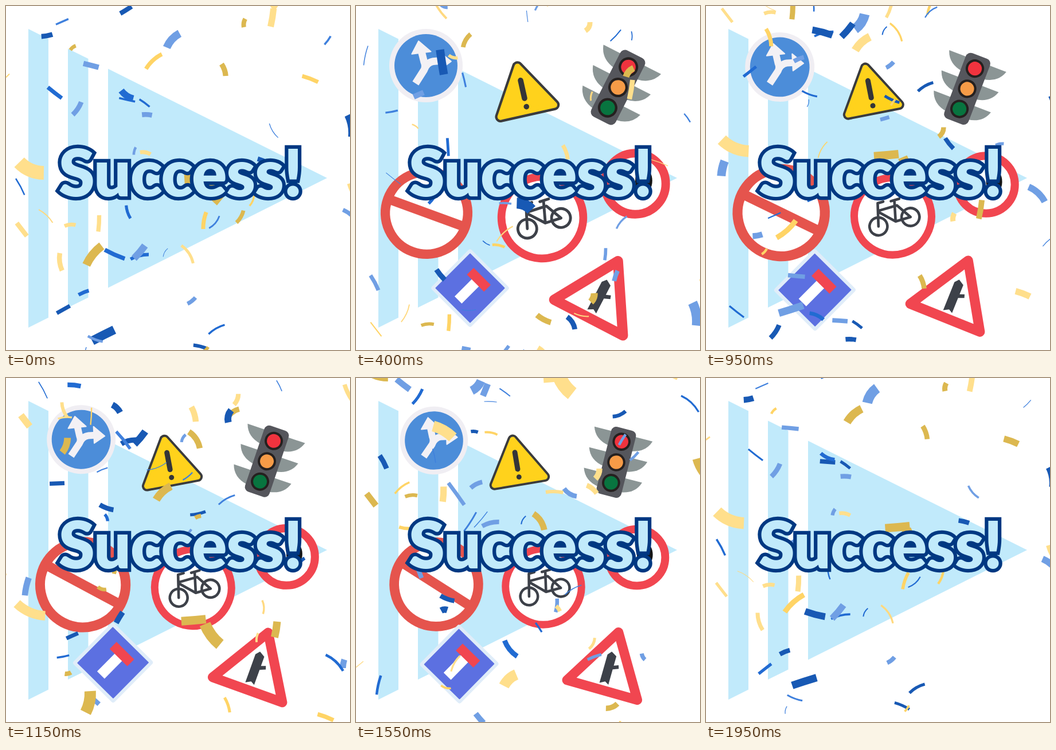
These frames come from a looping animation (600 px wide and 600 px high, 2000 ms). An HTML page:

```html
<!DOCTYPE html>
<html lang="en">
<head>
<meta charset="utf-8">
<title>Success</title>
<style>
  html, body { margin: 0; width: 100%; height: 100%; overflow: hidden; background: #fff; }
  svg { display: block; width: 100vw; height: 100vh; }
  .title {
    font: 900 114px Lato, "Open Sans", sans-serif;
    letter-spacing: -1px; text-anchor: middle;
    fill: #c1eafb; stroke: #003882; stroke-width: 12.5; paint-order: stroke;
  }
</style>
</head>
<body>
<svg viewBox="0 0 600 600" xmlns="http://www.w3.org/2000/svg">
  <path fill="#c1eafb" d="M39 40 74 57.500V543.500L39 561ZM108 74.500 143.500 92V508.500L108 526ZM178 109.500 560 300 178 491.500Z"/>

  <g id="arrows">
    <circle r="60" fill="#f0eef3"/><circle r="51.500" fill="#4c8dd9"/>
    <path d="M-17 29-3 7Q0 1-3-6L-7-22M-3 7Q1-5 12-7L25-8" fill="none" stroke="#f3f1f5" stroke-width="12"/>
    <path d="M-12-40-23-19 8-23ZM41-7 21-23 23 6Z" fill="#f3f1f5" stroke="#f3f1f5" stroke-width="2" stroke-linejoin="round"/>
  </g>

  <g id="warning" stroke-linejoin="round" stroke-linecap="round">
    <path d="M0-53 45 21H-45Z" fill="#3a3b3d" stroke="#3a3b3d" stroke-width="18"/>
    <path d="M0-53 45 21H-45Z" fill="#ffd21c" stroke="#ffd21c" stroke-width="10"/>
    <path d="M0-30V0" stroke="#343538" stroke-width="9"/>
    <circle cy="14" r="4.500" fill="#343538"/>
  </g>

  <g id="light">
    <g id="visors" fill="#8b9595"></g>
    <rect x="-22.500" y="-61" width="45" height="122" rx="9" fill="#55565c"/>
    <g id="lamps" stroke="#25201f" stroke-width="4"></g>
  </g>

  <g id="ring">
    <circle r="50" fill="#fff" stroke="#f14650" stroke-width="14"/>
    <ellipse cx="14" cy="-5" rx="14" ry="21" fill="#151515"/>
  </g>

  <g id="bike">
    <circle r="67" fill="#fff" stroke="#f14650" stroke-width="13"/>
    <g fill="none" stroke="#3d4149" stroke-width="4.600" stroke-linecap="round" stroke-linejoin="round">
      <circle cx="-29" cy="10" r="15.500"/><circle cx="29" cy="10" r="15.500"/>
      <path d="M-29 10-19-29H-9M-22-16H12L29 10H2L-22-14M10-25 2 10M4-26H19"/>
    </g>
  </g>

  <g id="junction">
    <path d="M0-70 64.500 36H-64.500Z" fill="#fff" stroke="#f14650" stroke-width="17" stroke-linejoin="round"/>
    <path d="M-8-27-2-34 8-28V-11L16-14 18-8 8-4V24L1 20-8 25Z" fill="#3d4149"/>
  </g>

  <g id="banned">
    <circle r="74" fill="#fff" stroke="#e5544d" stroke-width="17"/>
    <path d="M-72 0H72" stroke="#e5544d" stroke-width="17"/>
  </g>

  <g id="deadend">
    <rect x="-50" y="-50" width="100" height="100" rx="4" fill="#e0edf9"/>
    <rect x="-44" y="-44" width="88" height="88" rx="1" fill="#5c70e1"/>
    <rect x="-9" y="-14" width="18" height="44" fill="#fff"/>
    <rect x="-21" y="-30" width="43" height="17" fill="#f14650"/>
  </g>

  <g id="confetti" fill="none"></g>
  <text class="title" x="304" y="332">Success!</text>
</svg>

<script>
const LOOP = 2000, STEP = 50;
const byId = id => document.getElementById(id);
const lerp = (a, b, k) => a + (b - a) * k;
const clamp = v => Math.max(0, Math.min(1, v));

function add(parent, tag, attrs) {
  const node = document.createElementNS('http://www.w3.org/2000/svg', tag);
  for (const name in attrs) node.setAttribute(name, attrs[name]);
  return parent.appendChild(node);
}

['#f0333e', '#f69b47', '#08743f'].forEach((fill, i) => {
  const y = (i - 1) * 37.5;
  add(byId('visors'), 'path', { d: `M-53 ${y - 14}H53Q46 ${y + 8} 20 ${y + 12}H-20Q-46 ${y + 8}-53 ${y - 14}Z` });
  add(byId('lamps'), 'circle', { cy: y, r: 14, fill });
});

// start time, then x, y and angle at 400 ms and at 1550 ms
const signs = [
  ['arrows', 30, 122, 104, 0, 136, 109, 2],
  ['warning', 20, 294, 161, -12.6, 282, 159, -9.6],
  ['light', 0, 457, 142, 27, 454, 147, 14.3],
  ['ring', 0, 487, 310, 0, 490, 313, 0],
  ['bike', 0, 325, 369, -17.6, 327, 364, -15],
  ['junction', 90, 423, 510, 27.5, 439, 510, 15.8],
  ['banned', 228, 123, 361, 20, 140, 360, 32.5],
  ['deadend', 215, 199, 492, 45, 180, 499, 44.5]
].map(([id, start, ...pose]) => ({ node: byId(id), start, pose }));

// age and scale pairs: a quick pop, an overshoot and a slow settle
const POP = [[0, 0], [110, .73], [170, .97], [350, 1.07], [560, 1.045], [950, 1.005], [1350, .99], [2000, .98]];

function popScale(age) {
  if (age <= 0) return 0;
  const i = POP.findIndex(key => key[0] >= age);
  const [t0, s0] = POP[i - 1], [t1, s1] = POP[i];
  return lerp(s0, s1, (age - t0) / (t1 - t0));
}

function drawSign({ node, start, pose }, t) {
  const k = (t - 400) / 1150;
  const [x, y, angle] = [0, 1, 2].map(i => lerp(pose[i], pose[i + 3], k));
  const leave = clamp((t - 1650) / 250);
  const scale = popScale(t - start) * (1 - leave * leave);
  node.setAttribute('visibility', scale > 0 ? 'visible' : 'hidden');
  node.setAttribute('transform', `translate(${x} ${y}) rotate(${angle}) scale(${scale})`);
}

let seed = 71;
const random = () => (seed = seed * 16807 % 2147483647) / 2147483647;
const between = (a, b) => lerp(a, b, random());

const BLUES = ['#1859b4', '#216bd2', '#3f80dd', '#709fe4'];
const GOLDS = ['#dcb850', '#ffd466', '#ffd980', '#ffdf8c'];

const pieces = Array.from({ length: 66 }, (_, i) => {
  const near = random() ** 5;
  return {
    node: add(byId('confetti'), 'path', {}),
    colors: i % 9 < 5 ? BLUES : GOLDS,
    x: between(-10, 610), fall: random(),
    length: between(13, 34) + near * 36, width: between(5, 11) + near * 16,
    laps: near > .4 ? 2 : 1,
    sway: between(4, 22), phase: between(0, 6.28),
    angle: between(0, 360), turns: Math.round(between(-1, 1)),
    flips: Math.round(between(1, 3)), bend: between(-.22, .22)
  };
});

// Pieces gain speed as they fall, so the top of the stage is fuller.
function drawPiece(p, t) {
  const k = t / LOOP, spin = p.phase + k * p.flips * 2 * Math.PI;
  const x = p.x + p.sway * Math.sin(p.phase + k * 2 * Math.PI);
  const y = ((p.fall + k * p.laps) % 1) ** 1.3 * 720 - 50;
  const facing = Math.cos(spin);
  const half = p.length / 2 * (.75 + .25 * Math.abs(Math.sin(spin)));
  const sag = p.length * p.bend;
  p.node.setAttribute('d', `M${-half} ${sag / 2}Q0 ${-sag / 2} ${half} ${sag / 2}`);
  p.node.setAttribute('stroke', p.colors[Math.min(3, Math.floor((facing + 1.3) * 1.74))]);
  p.node.setAttribute('stroke-width', 1 + p.width * Math.abs(facing) ** 1.4);
  p.node.setAttribute('transform', `translate(${x} ${y}) rotate(${p.angle + k * p.turns * 360})`);
}

const begin = performance.now();

function render() {
  const t = Math.floor((performance.now() - begin) % LOOP / STEP) * STEP;
  signs.forEach(sign => drawSign(sign, t));
  pieces.forEach(piece => drawPiece(piece, t));
  requestAnimationFrame(render);
}
render();
</script>
</body>
</html>
```
